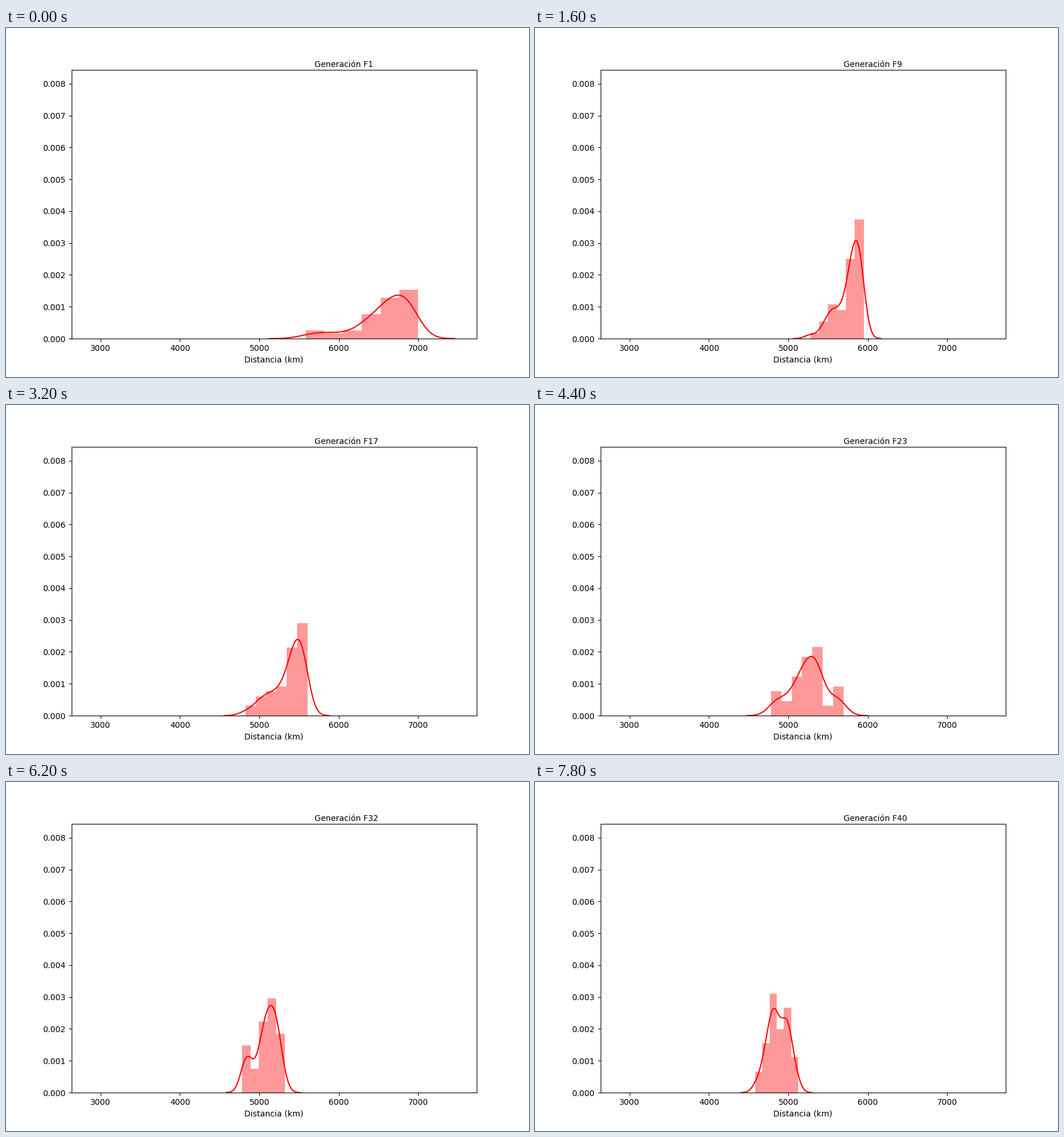
A matplotlib script that plays this animation: 900 by 600 pixels, repeating every 8 s.

```python
import numpy as np
import matplotlib.pyplot as plt
from matplotlib.animation import FuncAnimation

N_GENS = 40
INTERVAL = 200

# generation: (shortest, longest, share of the 50 routes in each bin)
STAGES = {
    1: (5583, 6996, [3, 2, 3, 9, 15, 18]),
    9: (5276, 5949, [1, 3, 6, 5, 14, 21]),
    17: (4821, 5607, [2, 4, 5, 6, 14, 19]),
    23: (4779, 5691, [5, 3, 8, 12, 14, 2, 6]),
    28: (4779, 5452, [7, 3, 8, 14, 14, 4]),
    35: (4779, 5225, [10, 2, 12, 13, 13]),
    40: (4581, 5123, [3, 7, 14, 9, 12, 5]),
}


def spread(lo, hi, counts):
    """Sorted distances; each bin's group leans towards its fuller neighbour."""
    width = (hi - lo) / len(counts)
    left, mid, right = [0] + counts[:-1], counts, counts[1:] + [0]
    dist = []
    for i, (a, n, b) in enumerate(zip(left, mid, right)):
        lean = 0.15 * (b - a) / (a + n + b)
        steps = (np.arange(n) + 0.5) / n - 0.5
        dist.extend(lo + width * (i + 0.5 + lean + 0.6 * steps))
    dist[0], dist[-1] = lo, hi
    return dist


# progress slows down with the generations, hence the square root
PACE = np.sqrt(list(STAGES))
ROUTES = np.array([spread(*stage) for stage in STAGES.values()]).T
BINS = [len(counts) for *_, counts in STAGES.values()]


def population(gen):
    pace = np.sqrt(gen)
    dist = np.array([np.interp(pace, PACE, route) for route in ROUTES])
    return dist, int(round(np.interp(pace, PACE, BINS)))


def kde(dist):
    """Gaussian density with Scott's bandwidth, cut three widths out."""
    bw = dist.std(ddof=1) * len(dist) ** -0.2
    x = np.linspace(dist[0] - 3 * bw, dist[-1] + 3 * bw, 100)
    z = (x[:, None] - dist) / bw
    return x, np.exp(-z ** 2 / 2).mean(axis=1) / (bw * np.sqrt(2 * np.pi))


fig, ax = plt.subplots(figsize=(9, 6), dpi=100)


def draw(frame):
    gen = frame + 1
    dist, bins = population(gen)
    ax.clear()
    ax.hist(dist, bins=bins, density=True, color="red", alpha=0.4)
    ax.plot(*kde(dist), color="red", lw=1.5)
    ax.set_xlim(2632, 7736)
    ax.set_ylim(0, 0.008435)
    ax.set_xlabel("Distancia (km)")
    ax.text(0.6, 1.01, f"Generación F{gen}", transform=ax.transAxes)
    return []


anim = FuncAnimation(fig, draw, frames=N_GENS, interval=INTERVAL,
                     init_func=lambda: [], repeat=True, repeat_delay=0)
plt.show()
```
